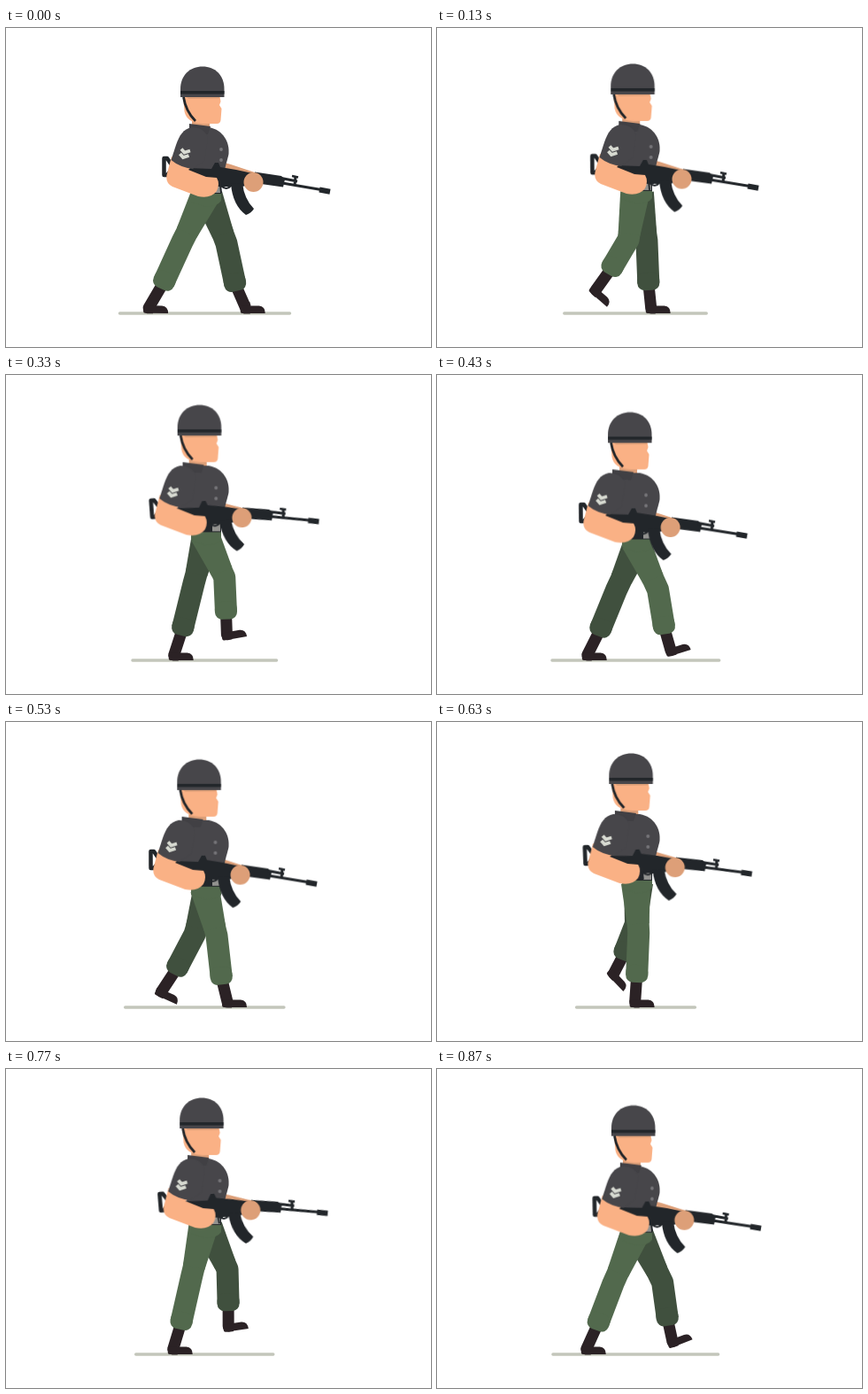
An HTML page without scripts that plays this animation: 480x360 px, repeating every 0.91 s.

```html
<!DOCTYPE html>
<html lang="en">
<head>
<meta charset="utf-8">
<title>Marching soldier</title>
<style>
html, body { margin: 0; width: 100%; height: 100%; overflow: hidden; background: #fff; }
svg { display: block; width: 480px; height: 360px; }
marker { overflow: visible; }

/* One stride is 910 ms; whatever repeats on every step takes half of that. */
.bob, .aim, .ground { animation: 455ms linear infinite; }
.bob { animation-name: bob; }
.aim { animation-name: aim; transform-origin: 235px 170px; }
.ground { animation-name: ground; fill: none; stroke: #c3c6bb; stroke-width: 3.4; stroke-linecap: round; }
.sway { animation: sway 910ms cubic-bezier(.37, 0, .63, 1) infinite; }
.leg, .boot { animation: leg 910ms linear infinite; fill: none; stroke-linejoin: round; }
.leg { stroke-width: 25; }
.boot { animation-name: boot; stroke: #2b2225; stroke-width: 13; marker-end: url(#foot); }
.far { transform: translateX(4px); }
.far path { animation-delay: -455ms; }
.near .leg { stroke: #52694d; marker-start: url(#thigh); marker-end: url(#cuff); }
.far .leg { stroke: #40503e; marker-start: url(#thigh-far); marker-end: url(#cuff-far); }

.green { fill: #52694d; }
.dark-green { fill: #40503e; }
.cloth { fill: #47464a; }
.black { fill: #22262a; }
.skin { fill: #fab185; }
.shade { fill: #dd9f78; }
.line { fill: none; stroke: #22262a; }

@keyframes sway { 50% { transform: translateX(var(--reach)); } }
@keyframes bob {
  0%, 100% { transform: none; animation-timing-function: ease-in; }
  28.6% { transform: translateY(-3px); }
  38.5% { transform: translateY(-8px); }
  50.5%, 56% { transform: translateY(-13.5px); }
  69.2% { transform: translateY(-11px); }
  91.2% { transform: translateY(-2.5px); }
}
@keyframes aim {
  0%, 100% { transform: none; }
  28.6% { transform: rotate(-.4deg); }
  38.5% { transform: rotate(-2.2deg); }
  50.5% { transform: rotate(-4.4deg); }
  69.2% { transform: rotate(-4.8deg); }
  91.2% { transform: rotate(-1.1deg); }
}
@keyframes ground {
  0%, 100% { d: path("M128.5 322H320.5"); animation-timing-function: ease-in; }
  28.6% { d: path("M143.5 322H304.5"); }
  38.5% { d: path("M157.5 322H291.5"); }
  50.5% { d: path("M164.5 322H284.5"); animation-timing-function: ease-in; }
  69.2% { d: path("M147 322H301.5"); animation-timing-function: ease-out; }
  91.2% { d: path("M131 322H317.5"); }
}
/* hip, knee, ankle */
@keyframes leg {
  0%, 100% { d: path("M225 190L199 241L178 287"); }
  14.3% { d: path("M224 187L216 239L197 271"); }
  19.2% { d: path("M224 182L220 228L207 261"); }
  25.3% { d: path("M225 176L239 224L229 257"); }
  34.6% { d: path("M225 179L246 226L247 265"); }
  46.5% { d: path("M225 188L251 242L257 283"); }
  50% { d: path("M225 190L245 243L255 289"); }
  64.3% { d: path("M225 187L233 240L235 288"); }
  69.2% { d: path("M225 182L228 238L226 286"); }
  75.3% { d: path("M223 176L215 234L213 286"); }
  84.6% { d: path("M223 179L210 233L198 286"); }
  95.6% { d: path("M223 188L199 242L182 287"); }
}
/* ankle, heel, direction of the toe */
@keyframes boot {
  0%, 100% { d: path("M178 287L161 316l5 0"); }
  14.3% { d: path("M197 271L179 296l3.8 3.3"); }
  19.2% { d: path("M207 261L195 284l3.4 3.6"); }
  25.3% { d: path("M229 257L220 281l4.1 2.9"); }
  34.6% { d: path("M247 265L247 290l5 -.7"); }
  46.5% { d: path("M257 283L263 309l4.6 -1.9"); }
  50% { d: path("M255 289L267 316l5 0"); }
  64.3% { d: path("M235 288L238 316l5 0"); }
  69.2% { d: path("M226 286L224 316l5 0"); }
  75.3% { d: path("M213 286L209 316l5 0"); }
  84.6% { d: path("M198 286L189 316l5 0"); }
  95.6% { d: path("M182 287L169 316l5 0"); }
}
</style>
</head>
<body>
<svg viewBox="0 0 480 360">
  <defs>
    <path id="thigh-shape" d="M0-16L46-12.5V12.5L0 17Z"/>
    <rect id="cuff-shape" x="-12" y="-12.5" width="20" height="25" rx="8"/>
    <marker id="thigh" orient="auto" markerUnits="userSpaceOnUse"><use href="#thigh-shape" class="green"/></marker>
    <marker id="cuff" orient="auto" markerUnits="userSpaceOnUse"><use href="#cuff-shape" class="green"/></marker>
    <marker id="thigh-far" orient="auto" markerUnits="userSpaceOnUse"><use href="#thigh-shape" class="dark-green"/></marker>
    <marker id="cuff-far" orient="auto" markerUnits="userSpaceOnUse"><use href="#cuff-shape" class="dark-green"/></marker>
    <marker id="foot" orient="auto" markerUnits="userSpaceOnUse"><path d="M-11-2V4Q-11 6-9 6H17Q17-2 10-2.500H0Z" fill="#2b2225"/></marker>
  </defs>

  <path class="ground" d="M128.5 322H320.5"/>

  <g class="far">
    <path class="boot" d="M255 289L267 316l5 0"/>
    <path class="leg" d="M225 190L245 243L255 289"/>
  </g>
  <g class="near">
    <path class="boot" d="M178 287L161 316l5 0"/>
    <path class="leg" d="M225 190L199 241L178 287"/>
  </g>

  <g class="bob">
    <path class="green" d="M209 185H243V195Q239 201 226 202L209 196Z"/>

    <!-- far arm -->
    <g class="sway" style="--reach:-16px"><g class="aim">
      <path class="shade" d="M240 150L254 154L284 164L280 174L240 166Z"/>
    </g></g>

    <!-- head -->
    <g class="sway" style="--reach:-4px">
      <path class="shade" d="M210 98H230V113H210Z"/>
      <path class="skin" d="M200 77H241.500L242.500 83L241 87L243.500 91L242.500 104Q242 108 238 108H222Q204 107 201.500 94Z"/>
      <path class="shade" d="M203 77H241V79.500L206 80Z"/>
      <path class="line" d="M200.500 78Q203 94 214 105" stroke-width="2.800"/>
      <path class="cloth" d="M197 78V69C197 53 208 43.500 222 43.500S246.500 53 246.500 69V78Z"/>
      <path class="black" d="M197 71H246.500V74.500H197Z"/>
    </g>

    <!-- torso -->
    <path class="cloth" d="M207 112H229C246 115 253 130 251.500 142C250 151 246 157 245 179H209Z"/>
    <path class="black" d="M209 177H243V187H209Z"/>
    <path d="M233 177H242V186H233Z" fill="#92928f"/>
    <path class="sway" style="--reach:-9px" d="M207 108L231 111L228 120H207Z" fill="#414044"/>
    <g class="sway" style="--reach:-7px" fill="#77767a">
      <circle cx="243" cy="137" r="1.900"/>
      <circle cx="243" cy="149" r="1.900"/>
    </g>

    <!-- rifle and near arm -->
    <g class="sway" style="--reach:-16px">
      <path class="cloth" d="M206 120H232V172H214L205 155Z"/>
      <g class="aim">
        <path class="line" d="M212 161L186 153L182 147H178.500V166H182L187 160" stroke-width="4.500" stroke-linejoin="round"/>
        <path class="black" d="M206 158L232 159L236 152L240 152L242 157L260 160L283 165L282 176L266 179L240 179L208 170Z"/>
        <path class="black" d="M281 162.500L311 167L315 171L313 179.500L281 175Z"/>
        <path class="line" d="M312 175L356 182.500" stroke-width="3"/>
        <path class="line" d="M354 182.500L366 184.800" stroke-width="6" stroke-linejoin="round"/>
        <path class="line" d="M311 169.500L329 173M326 178L327 167" stroke-width="3"/>
        <path class="line" d="M323 167L330 168.500" stroke-width="2.500"/>
        <path class="black" d="M254 176L267 175Q269 193 280 204Q277 209 271 211Q256 200 254 176Z"/>
        <path class="line" d="M242 176L243 186M243 178Q249 184 254 178" stroke-width="2"/>
        <circle class="shade" cx="279.500" cy="174" r="11"/>
      </g>
      <path class="skin" d="M187 145L181.500 166Q180 175 188 179L217 190Q231 193 238 184Q242 176 238 169L226 168L206 160L213 153Z"/>
      <path class="cloth" d="M210 112C200 114 196 121 192 132L186.500 149Q196 157 211 159L224 150L228 124Q224 112 210 112Z"/>
      <path d="M198 136.500L201.500 140.500L208 138.500M196.500 142L200 146L206.500 144" fill="none" stroke="#d8dbd2" stroke-width="3.800"/>
    </g>
  </g>
</svg>
</body>
</html>
```
